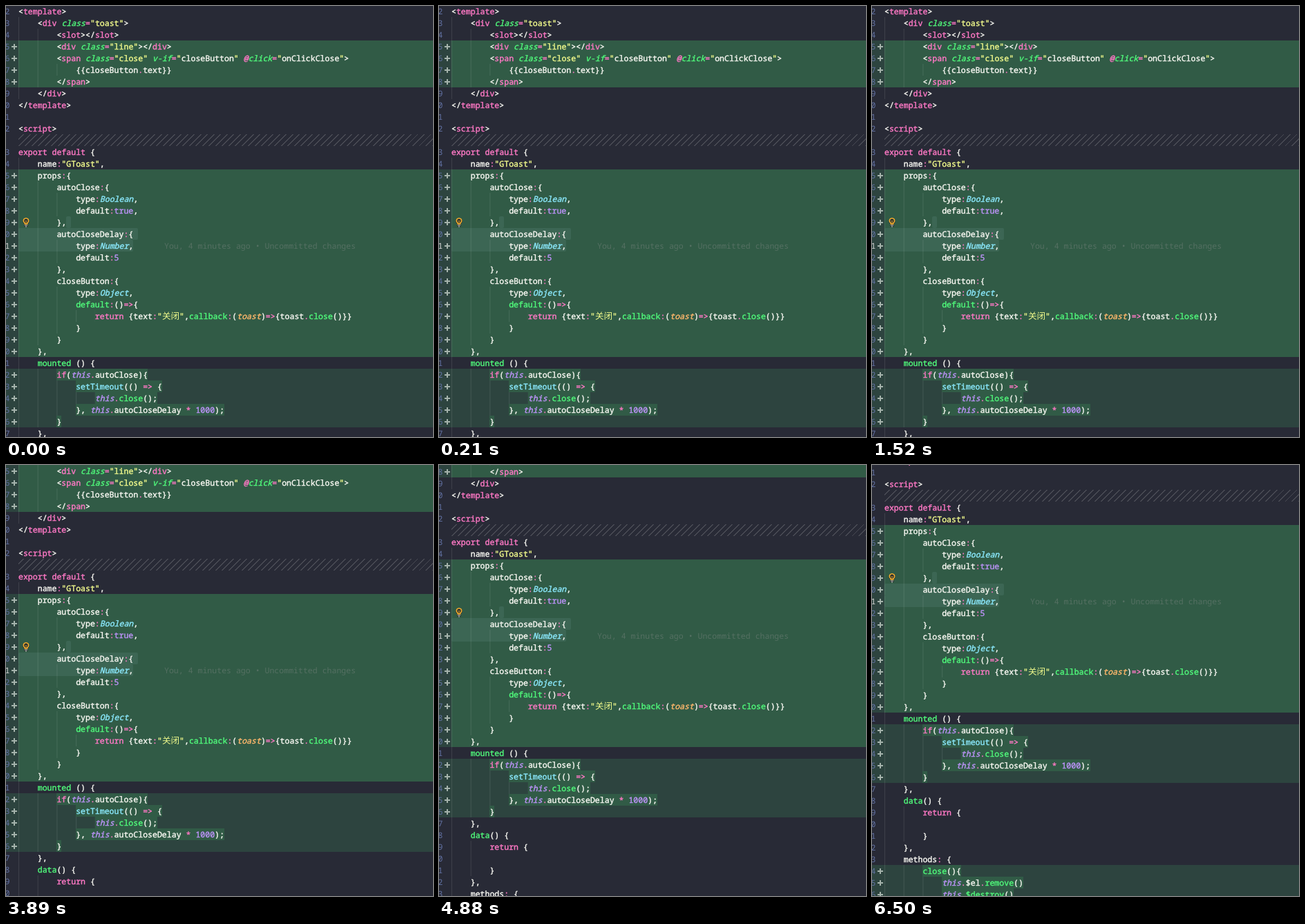
These frames come from a looping animation (618x625 px, 8000 ms). An HTML page:

```html
<!DOCTYPE html>
<html lang="en">
<head>
<meta charset="utf-8">
<title>Diff view</title>
<style>
html, body { margin: 0; width: 100%; height: 100%; overflow: hidden; background: #282a36; }
body { position: relative; }
#doc {
  position: absolute; inset: 0 0 auto; color: #f8f8f2; white-space: pre;
  font: 11.55px/17px "Noto Sans Mono", "Noto Sans CJK SC", monospace;
  text-rendering: geometricPrecision; font-variant-ligatures: none;
}
.row { position: relative; height: 17px; }
.row > * { position: absolute; top: 0; left: 18px; height: 17px; }
.add, .soft { background: #2d443f; }
.fill { right: 0; background: #315b46; }
.code span { position: relative; top: 1px; }
.code { -webkit-text-stroke: .4px; }
.soft .code { background: linear-gradient(#315b46 0 0) content-box; }
.row > .num { top: 1px; left: auto; right: calc(100% - 5.5px); color: #6272a4; }
.row > .num.now { color: #d8d8d8; }
.row > .plus {
  left: 8px; top: 5px; width: 8px; height: 8px;
  background: linear-gradient(#a5b3ac 0 0) center/8px 2px no-repeat,
              linear-gradient(#a5b3ac 0 0) center/2px 8px no-repeat;
}
.guides { background: linear-gradient(90deg, #ffffff1a 1px, #0000 0) 0 0/4ch 100%; }
.row > .sel { background: #3c6654; border-radius: 2px; }
.row > .blame { top: 1px; left: 229px; color: #99999959; }
.row > .bulb { left: 22px; }
.hatch {
  margin-left: 18px; height: 17px;
  background: repeating-linear-gradient(-45deg, #cccccc33 0 1.4px, #0000 0 6.72px);
}
.p { color: #ff79c6 } .g { color: #50fa7b } .y { color: #f1fa8c } .u { color: #bd93f9 }
.c { color: #8be9fd } .o { color: #ffb86c } .it { font-style: italic }
.k { color: #f1fa8c; font-size: 12.6px; line-height: 0; -webkit-text-stroke: 0 }
#cursor { position: absolute; left: 567px; top: 611px; }
</style>
</head>
<body>
<div id="doc"></div>
<svg id="cursor" width="8" height="14" fill="none" stroke="#e4e4e4"><path d="M0 .5H3M4 .5H7M3.5 1V14"/></svg>
<script>
// Each line is an indent level and tokens "key + text"; an upper-case key is italic.
const lines = [
  [0, 'w<|ptemplate|w>'],
  [1, 'w<|pdiv|w |Gclass|p=|y"toast"|w>'],
  [2, 'w<|pslot|w></|pslot|w>'],
  [2, 'w<|pdiv|w |Gclass|p=|y"line"|w></|pdiv|w>'],
  [2, 'w<|pspan|w |Gclass|p=|y"close"|w |Gv-if|p=|y"|wcloseButton|y"|w |P@|Gclick|p=|y"|wonClickClose|y"|w>'],
  [3, 'w{{closeButton|p.|wtext}}'],
  [2, 'w</|pspan|w>'],
  [1, 'w</|pdiv|w>'],
  [0, 'w</|ptemplate|w>'],
  [0, ''],
  [0, 'w<|pscript|w>'],
  [0, 'pexport default|w {'],
  [1, 'wname|p:|y"GToast"|w,'],
  [1, 'wprops|p:|w{'],
  [2, 'wautoClose|p:|w{'],
  [3, 'wtype|p:|CBoolean|w,'],
  [3, 'wdefault|p:|utrue|w,'],
  [2, 'w},'],
  [2, 'wautoCloseDelay|p:|w{'],
  [3, 'wtype|p:|CNumber|w,'],
  [3, 'wdefault|p:|u5'],
  [2, 'w},'],
  [2, 'wcloseButton|p:|w{'],
  [3, 'wtype|p:|CObject|w,'],
  [3, 'gdefault|p:|w()|p=>|w{'],
  [4, 'preturn|w {text|p:|y"|k关闭|y"|w,|gcallback|p:|w(|Otoast|w)|p=>|w{toast|p.|gclose|w()}}'],
  [3, 'w}'],
  [2, 'w}'],
  [1, 'w},'],
  [1, 'gmounted|w () {'],
  [2, 'pif|w(|Uthis|p.|wautoClose){'],
  [3, 'csetTimeout|w(() |p=>|w {'],
  [4, 'Uthis|p.|gclose|w();'],
  [3, 'w}, |Uthis|p.|wautoCloseDelay |p*|w |u1000|w);'],
  [2, 'w}'],
  [1, 'w},'],
  [1, 'gdata|w() {'],
  [2, 'preturn|w {'],
  [2, ''],
  [2, 'w}'],
  [1, 'w},'],
  [1, 'wmethods|p:|w {'],
  [2, 'gclose|w(){'],
  [3, 'Uthis|p.|w$el|p.|gremove|w()'],
  [3, 'Uthis|p.|g$destroy|w()']
];
const selected = { 19: [10, 1], 20: [0, 25], 21: [0, 24] };
const bulb = `<svg class="bulb" width="14" height="17" fill="none">
  <path d="M4.5 11.5C1 8.500 1.500 2.500 7 2.500S13 8.500 9.500 11.500V15H4.500z" fill="#2a2f30"/>
  <path d="M5.300 11V9.700A3.700 3.700 0 1 1 8.700 9.700V11z" stroke="#f5b02e" stroke-width="1.600"/>
  <path d="M5.500 6L7 7.500 8.500 6M7 7.500V11" stroke="#f5b02e" stroke-width=".8"/>
  <path d="M5 13h4M6 15h2" stroke="#d0d0c8"/></svg>`;

const within = (n, a, b) => n >= a && n <= b;
const kind = n => within(n, 5, 8) || within(n, 15, 30) ? 'add'
  : within(n, 32, 36) || n >= 44 ? 'soft' : '';

function token(s) {
  const key = s[0], low = key.toLowerCase();
  return `<span class="${low}${key !== low ? ' it' : ''}">${s.slice(1).replace(/</g, '&lt;')}</span>`;
}

function row([level, text], i) {
  const n = i + 2, type = kind(n), sel = selected[n];
  return `<div class="row ${type}">` +
    (type === 'add' ? '<i class="fill"></i>' : '') +
    (sel ? `<i class="sel" style="left:calc(18px + ${sel[0]}ch);width:${sel[1]}ch"></i>` : '') +
    `<i class="guides" style="width:${level * 4}ch"></i>` +
    `<span class="num${n === 21 ? ' now' : ''}">${n}</span>` +
    (type ? '<i class="plus"></i>' : '') +
    `<div class="code" style="padding-left:${level * 4}ch">${text && text.split('|').map(token).join('')}</div>` +
    (n === 19 ? bulb : '') +
    (n === 21 ? '<div class="blame">You, 4 minutes ago • Uncommitted changes</div>' : '') +
    '</div>' + (n === 12 ? '<div class="hatch"></div>' : '');
}

const doc = document.getElementById('doc'), cursor = document.getElementById('cursor');
doc.innerHTML = lines.map(row).join('');

const wheelTimes = [2400, 4880, 6500];
function draw() {
  const t = performance.now() % 8000;
  doc.style.top = -1 - 50 * wheelTimes.filter(w => t >= w).length + 'px';
  cursor.style.visibility = t >= 140 && t < 210 ? 'visible' : 'hidden';
  requestAnimationFrame(draw);
}
draw();
</script>
</body>
</html>
```
